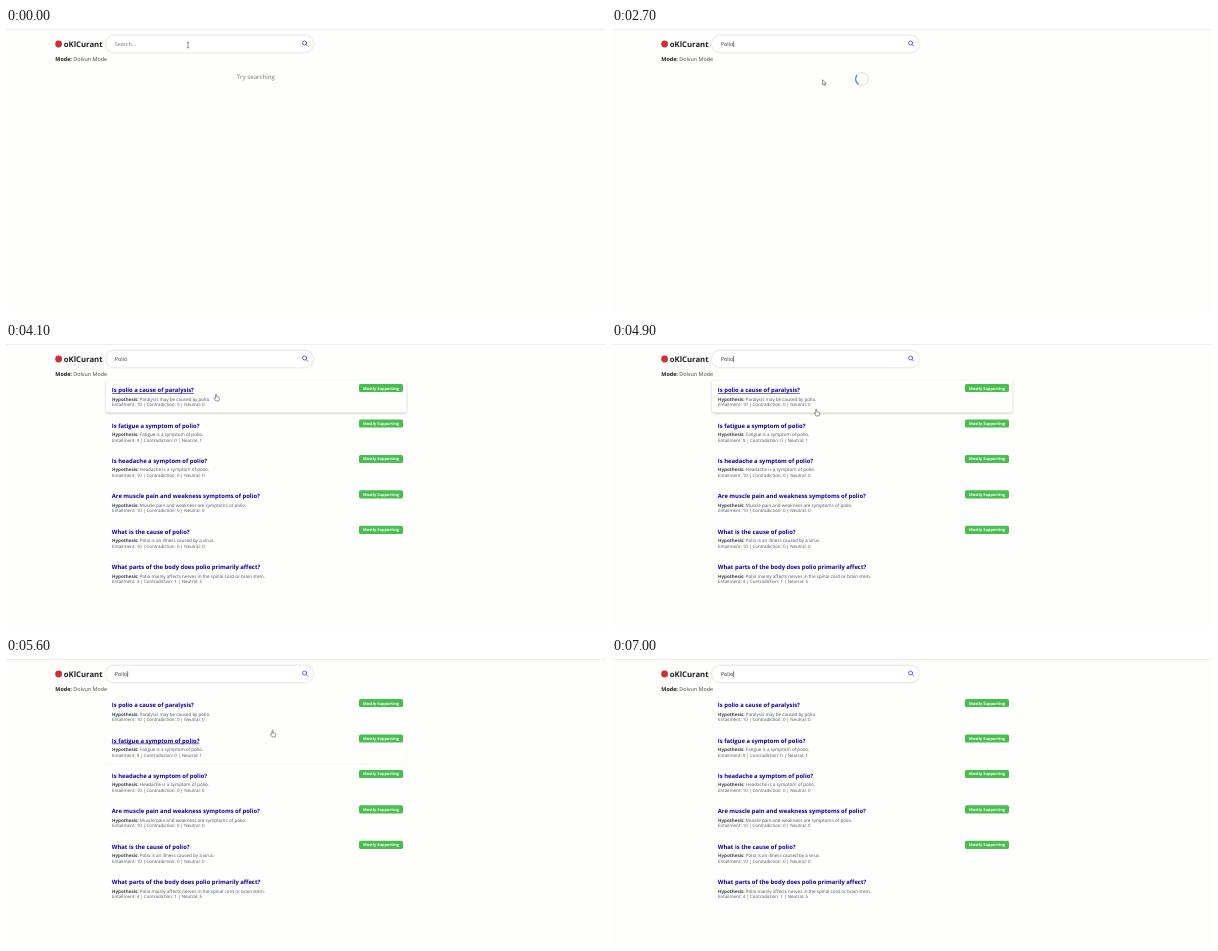
An HTML page that plays this animation: 600x287 px, repeating every 7.1 s.

```html
<!DOCTYPE html>
<html lang="en">
<head>
<meta charset="utf-8">
<title>Search demo</title>
<style>
  html, body { margin: 0; width: 100%; height: 100%; overflow: hidden; background: #fefefc; }
  svg { display: block; width: 600px; height: 287px; }
  text { font-family: "Open Sans", "Noto Sans", sans-serif; text-rendering: geometricPrecision; fill: #4b5261; }
  .b { font-weight: 700; }
  .brand { font-size: 7.73px; fill: #1d1f23; }
  .mode { font-size: 5.4px; fill: #444; }
  .mode .b { fill: #1d1f23; }
  .query { font-size: 5.4px; fill: #333; }
  .query.empty { fill: #777; }
  .hint { font-size: 6.15px; fill: #777; }
  .title { font-size: 5.87px; fill: #12009c; }
  .hovered { text-decoration: underline; }
  .claim { font-size: 4.55px; }
  .claim .b { fill: #3c424e; }
  .stats { font-size: 4.45px; }
  .badge { font-size: 3.95px; fill: #fff; }
  .box { fill: #fff; filter: drop-shadow(0 .8px .9px rgba(0, 0, 0, .22)); }
  .card { fill: #fefefd; filter: drop-shadow(0 1px 1.2px rgba(0, 0, 0, .22)); }
</style>
</head>
<body>
<svg viewBox="0 0 600 287">
  <rect width="600" height="287" fill="#fefefc"/>
  <rect y="1" width="600" height="1" fill="#efefed"/>
  <circle cx="52.6" cy="16" r="3.4" fill="#cf3038"/>
  <text class="brand b" x="57.8" y="18.8">oKlCurant</text>
  <rect class="box" x="100" y="7.8" width="207" height="16.4" rx="8.2"/>
  <text class="query" id="query" x="108.8" y="17.9"></text>
  <rect id="caret" y="13.2" width=".6" height="5.8" fill="#222"/>
  <g fill="none" stroke="#4a5ad0" stroke-width=".9" stroke-linecap="round">
    <circle cx="298.6" cy="15" r="2"/>
    <path d="M300.1 16.5l1.6 1.6"/>
  </g>
  <text class="mode" x="49.3" y="33"><tspan class="b">Mode:</tspan> Dolvun Mode</text>
  <text class="hint" id="hint" x="231" y="51">Try searching</text>
  <g id="spinner" fill="none">
    <circle r="6.4" stroke="#d5dedf" stroke-width=".9"/>
    <path id="arc" stroke="#459fae" stroke-width="1.4"/>
  </g>
  <g id="results"></g>
  <g id="cursor" stroke="#444" stroke-width=".55" stroke-linejoin="round">
    <path id="beam" fill="none" d="M-1.2 -2.7H1.2M0 -2.7V2.7M-1.2 2.7H1.2"/>
    <path id="arrow" fill="#fff" d="M0 -2.8V2.3L1.2 1.3L2 3L2.9 2.6L2.1 .9H3.6Z"/>
    <path id="hand" fill="#fff" d="M-1 -3.1Q-.4 -3.8 .1 -3.1V-.9L2.5 -.3Q3 0 2.9 1L2.3 3.4H-.8L-2.6 .9Q-2.5 0 -1.7 .3L-1 .9Z"/>
  </g>
</svg>
<script>
const LOOP = 7100, STEP = 100;
const WORD = "Polio", TYPE = 1700, KEY = 200, BLINK = 508;
const LOAD = 2700, READY = 3800, BACK = 5500, LEAVE = 5900;
const TOP = 37.7, PITCH = 35.45, FADE = 300;
const $ = id => document.getElementById(id);

const rows = [
  ["Is polio a cause of paralysis?", "Paralysis may be caused by polio.", 10, 0, 0],
  ["Is fatigue a symptom of polio?", "Fatigue is a symptom of polio.", 9, 0, 1],
  ["Is headache a symptom of polio?", "Headache is a symptom of polio.", 10, 0, 0],
  ["Are muscle pain and weakness symptoms of polio?", "Muscle pain and weakness are symptoms of polio.", 10, 0, 0],
  ["What is the cause of polio?", "Polio is an illness caused by a virus.", 10, 0, 0],
  ["What parts of the body does polio primarily affect?", "Polio mainly affects nerves in the spinal cord or brain stem.", 4, 1, 5]
];

const badge = `<rect x="353" y="41" width="44" height="8.1" rx="1.6" fill="#4abd50"/>
  <text class="badge b" x="357" y="46.6">Mostly Supporting</text>`;

$("results").innerHTML = rows.map(([title, claim, yes, no, neutral], i) => `
  <g transform="translate(0 ${i * PITCH})">
    <rect class="card" x="100" y="${TOP}" width="300.5" height="31.8" rx="1.8"/>
    <text class="title b" x="105.8" y="49.1">${title}</text>
    <text class="claim" x="106" y="57.6"><tspan class="b">Hypothesis:</tspan> ${claim}</text>
    <text class="stats" x="106" y="63.1">Entailment: ${yes} | Contradiction: ${no} | Neutral: ${neutral}</text>
    ${yes > 5 ? badge : ""}
  </g>`).join("");

const cards = document.querySelectorAll(".card");
const titles = document.querySelectorAll(".title");
const show = (el, on) => el.setAttribute("visibility", on ? "visible" : "hidden");
const place = (el, x, y) => el.setAttribute("transform", `translate(${x} ${y})`);
const point = a => `${6.4 * Math.cos(a)} ${6.4 * Math.sin(a)}`;
$("arc").setAttribute("d", `M${point(-.85)}A6.4 6.4 0 0 1 ${point(.85)}`);

function ease(t, from, to) {
  const p = Math.min(1, Math.max(0, (t - from) / (to - from)));
  return p * p * (3 - 2 * p);
}

// leave the search box, go to the second card, come back to its edge
function pointer(t) {
  const out = ease(t, 400, 700), down = ease(t, 4700, 5200), back = ease(t, 5400, BACK);
  return {
    x: 182 + 28.5 * out - 16.5 * down + 73 * back,
    y: 17 + 37.5 * out + 42.8 * down - 21.7 * back
  };
}

const hoverRow = t => t < READY || t >= LEAVE ? -1 : Math.floor((pointer(t).y - TOP) / PITCH);

// share of the last FADE ms spent over a card; starts afresh on coming back
function glow(row, t) {
  const start = Math.max(t - FADE, t < BACK ? READY : BACK);
  let hits = 0;
  for (let s = start; s < t; s += 10) if (hoverRow(s) === row) hits += 10;
  return (hits / FADE) ** 2;
}

function drawQuery(t) {
  const text = WORD.slice(0, Math.max(0, Math.floor((t - TYPE) / KEY) + 1));
  const query = $("query"), typing = t >= TYPE && t < TYPE + KEY * WORD.length;
  query.textContent = text || "Search...";
  query.classList.toggle("empty", !text);
  $("caret").setAttribute("x", 109 + (text ? query.getComputedTextLength() : 0));
  show($("caret"), typing || Math.floor(t / BLINK) % 2);
}

function drawSpinner(t) {
  show($("spinner"), t >= LOAD && t < READY);
  const turn = 170 + (Math.max(t, LOAD + 200) - 3700) * .45;
  $("spinner").setAttribute("transform", `translate(250 51) rotate(${turn})`);
}

function drawResults(t) {
  $("results").style.display = t >= READY ? "" : "none";
  cards.forEach((el, i) => el.setAttribute("opacity", glow(i, t)));
  titles.forEach((el, i) => el.classList.toggle("hovered", i === hoverRow(t)));
}

function drawCursor(t) {
  const { x, y } = pointer(t);
  const shape = t >= LEAVE ? "" : t >= READY ? "hand" : y < 25 ? "beam" : "arrow";
  for (const id of ["beam", "arrow", "hand"]) show($(id), id === shape);
  place($("cursor"), x, y);
}

function tick() {
  const t = Math.floor(performance.now() % LOOP / STEP) * STEP;
  drawQuery(t);
  show($("hint"), t < LOAD);
  drawSpinner(t);
  drawResults(t);
  drawCursor(t);
  requestAnimationFrame(tick);
}
tick();
</script>
</body>
</html>
```
